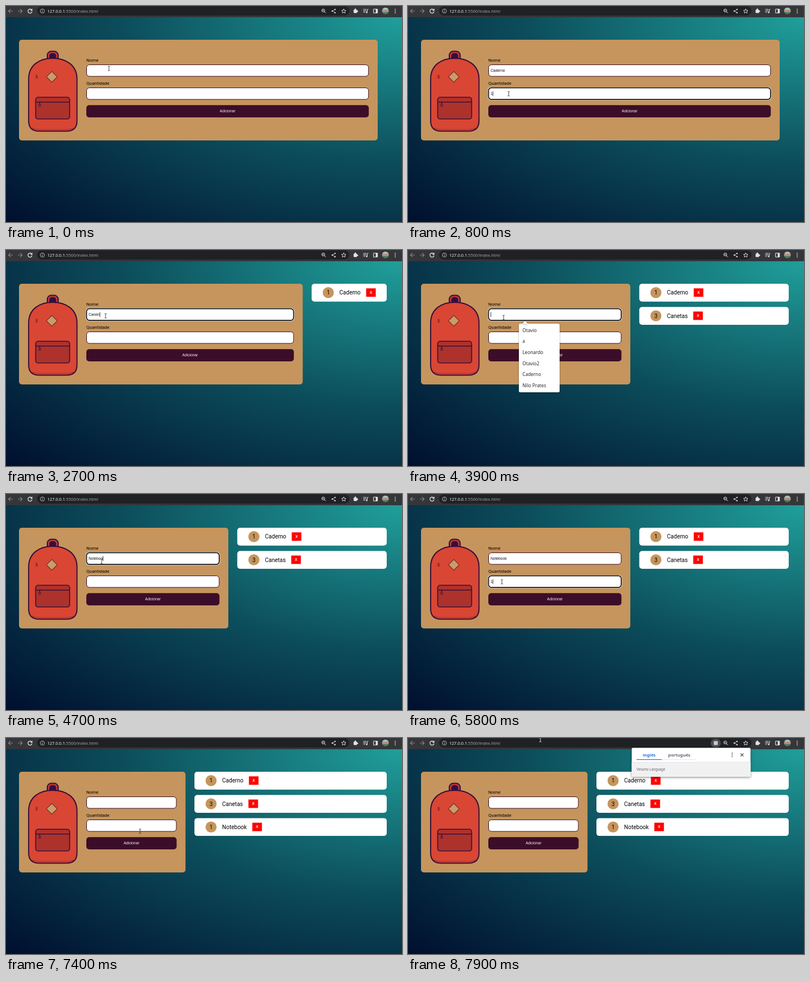
Recreate the animation shown at these times as an HTML page with a canvas. Size 700 px wide and 384 px high, loop 8 s.

```html
<!DOCTYPE html>
<html lang="pt">
<head>
<meta charset="utf-8">
<title>Mochila</title>
<style>
html, body { margin: 0; width: 100%; height: 100%; overflow: hidden; background: #0b4b59; }
canvas { display: block; width: 700px; height: 384px; }
</style>
</head>
<body>
<canvas id="stage" width="700" height="384"></canvas>
<script>
const ctx = document.getElementById('stage').getContext('2d');
const LOOP = 8000, STEP = 100;
const TAN = '#c5955d', WINE = '#3c0d28', INK = '#3a0f38';
const UI = '"Noto Sans", sans-serif', PAGE = 'Roboto, sans-serif', FIELD = '"Liberation Sans", Arial, sans-serif';
const SUGGESTIONS = ['Otavio', 'a', 'Leonardo', 'Otavio2', 'Caderno', 'Nilo Prates'];
const PRODUCTS = [['1', 'Caderno'], ['3', 'Canetas'], ['1', 'Notebook']];
const FORM_RIGHT = [657, 524.5, 393, 317.3];

// Each event overrides part of the page state from its time on.
const EVENTS = [
  [0, { focus: '', name: '', qty: '', items: 0, menu: false, popup: false }],
  [200, { focus: 'name', menu: true }],
  [300, { name: 'Ca' }], [400, { name: 'Cade' }],
  [500, { name: 'Caderno', menu: false }],
  [700, { focus: 'qty' }], [800, { qty: '1' }],
  [1100, { focus: '', name: '', qty: '', items: 1 }],
  [1400, { focus: 'name', menu: true }],
  [1800, { name: 'C' }], [2000, { name: 'Ca' }], [2200, { name: 'Can' }],
  [2500, { name: 'Cane' }], [2700, { name: 'Canen' }], [2800, { name: 'Cane' }],
  [2900, { name: 'Caneta' }], [3000, { name: 'Canetas', menu: false }],
  [3300, { focus: 'qty' }], [3400, { qty: '3' }],
  [3700, { focus: '', name: '', qty: '', items: 2 }],
  [3900, { focus: 'name', menu: true }],
  [4200, { name: 'N' }], [4300, { name: 'No' }], [4400, { name: 'Not' }],
  [4500, { name: 'Note' }], [4600, { name: 'Noteb' }], [4700, { name: 'Noteboo' }],
  [4800, { name: 'Notebook', menu: false }],
  [5400, { focus: 'qty' }], [5700, { qty: '1' }],
  [6300, { focus: '', name: '', qty: '', items: 3 }],
  [7700, { popup: true }]
];

const POINTER = [
  [0, 182, 111], [500, 182, 113], [650, 178, 156], [850, 178, 156], [1000, 215, 188],
  [1150, 215, 188], [1400, 176, 117], [3050, 176, 117], [3250, 172, 156], [3400, 172, 156],
  [3600, 200, 188], [3700, 200, 188], [3850, 169, 120], [4900, 169, 120], [5300, 166, 156],
  [5800, 166, 156], [6200, 206, 188], [6700, 206, 188], [7100, 232, 250], [7500, 238, 150],
  [7800, 234, 3], [8000, 234, 3]
];

function stateAt(t) {
  return Object.assign({}, ...EVENTS.filter(e => e[0] <= t).map(e => e[1]));
}

function pointerAt(t) {
  const i = POINTER.findIndex(p => p[0] > t);
  const [t0, x0, y0] = POINTER[i - 1], [t1, x1, y1] = POINTER[i];
  const u = (t - t0) / (t1 - t0), k = u * u * (3 - 2 * u);
  return [x0 + (x1 - x0) * k, y0 + (y1 - y0) * k];
}

function paint(fill, stroke, width = 1) {
  if (fill) { ctx.fillStyle = fill; ctx.fill(); }
  if (stroke) { ctx.strokeStyle = stroke; ctx.lineWidth = width; ctx.stroke(); }
}

function box(x, y, w, h, r, fill, stroke, width) {
  ctx.beginPath();
  ctx.roundRect(x, y, w, h, r);
  paint(fill, stroke, width);
}

function disc(x, y, r, fill, stroke, width) {
  ctx.beginPath();
  ctx.arc(x, y, r, 0, Math.PI * 2);
  paint(fill, stroke, width);
}

function shape(path, fill, stroke, width) {
  const p = new Path2D(path);
  if (fill) { ctx.fillStyle = fill; ctx.fill(p); }
  if (stroke) { ctx.strokeStyle = stroke; ctx.lineWidth = width || 1; ctx.stroke(p); }
}

function text(str, x, y, font, color, align = 'left') {
  ctx.font = font;
  ctx.fillStyle = color;
  ctx.textAlign = align;
  ctx.fillText(str, x, y);
  return ctx.measureText(str).width;
}

function shadowed(draw, blur, alpha) {
  ctx.save();
  ctx.shadowColor = `rgba(0,0,0,${alpha})`;
  ctx.shadowBlur = blur;
  ctx.shadowOffsetY = 1;
  draw();
  ctx.restore();
}

function drawBackground() {
  ctx.save();
  ctx.translate(700, 20);
  ctx.scale(700 * Math.SQRT2, 364 * Math.SQRT2);
  const g = ctx.createRadialGradient(0, 0, 0, 0, 0, 1);
  g.addColorStop(0, '#209f9b');
  g.addColorStop(0.5, '#0c4d5b');
  g.addColorStop(1, '#000f2e');
  ctx.fillStyle = g;
  ctx.fillRect(-1, 0, 1, 1);
  ctx.restore();
}

function drawToolbar(popup) {
  const light = '#e3e4e6', dim = '#85878a';
  ctx.fillStyle = '#35363a';
  ctx.fillRect(0, 0, 700, 19.5);
  box(55, 0.5, 552, 16.5, 8.2, '#202124');
  shape('M12 9H4.5M8 5.3L4.3 9L8 12.7', null, dim, 1.1);
  shape('M21 9H28.5M25 5.3L28.7 9L25 12.7', null, dim, 1.1);
  shape('M45.4 7A3.6 3.6 0 1 0 46 9.8', null, light, 1.3);
  shape('M46.6 4.6V8.4H42.8Z', light);
  disc(64.3, 9, 3.7, null, '#c4c6c9', 0.9);
  shape('M64.3 8.4V11M64.3 6.5V7.4', null, '#c4c6c9', 0.9);
  const host = text('127.0.0.1', 73, 11.6, '7.4px ' + UI, '#f1f2f3');
  text(':5500/index.html', 73 + host, 11.6, '7.4px ' + UI, '#a0a3a7');

  if (popup) {
    box(535, 1.5, 18, 15, 7.5, '#4b4d51');
    box(540.5, 5.5, 7, 7, 1, '#c9cbce');
  }
  disc(560.8, 8, 2.6, null, light, 1);
  shape('M562.8 10L565.4 12.6M559.5 8H562', null, light, 1);
  shape('M581.5 6.2L576.8 9L581.5 11.8', null, light, 0.8);
  for (const [x, y] of [[581.6, 6.1], [576.7, 9], [581.6, 11.9]]) disc(x, y, 1.2, light);
  shape('M597 5L598.1 7.7L601 7.9L598.8 9.8L599.5 12.6L597 11.1L594.5 12.6L595.2 9.8L593 7.9L595.9 7.7Z', null, light, 0.9);
  box(614.5, 6.5, 6, 6, 0.8, light);
  disc(617.5, 6, 1.4, light);
  disc(621, 9.4, 1.4, light);
  shape('M631.5 6H637M631.5 8.5H637M631.5 11H635M638.5 11.5V6H640.5', null, light, 1);
  disc(637.6, 11.4, 1.3, light);
  box(649.7, 5.5, 7, 7, 0.8, null, light, 1.1);
  ctx.fillStyle = light;
  ctx.fillRect(653.6, 5.5, 3, 7);
  ctx.save();
  ctx.beginPath();
  ctx.arc(670.7, 8.8, 6, 0, 7);
  ctx.clip();
  const bands = ['#9fc3c4', '#b98d78', '#3f8061'];
  bands.forEach((c, i) => { ctx.fillStyle = c; ctx.fillRect(664, 2.5 + i * 4.2, 14, 4.5); });
  ctx.restore();
  for (const y of [5.8, 9, 12.2]) disc(688, y, 0.9, light);
}

function drawBackpack() {
  box(73, 80.6, 19.2, 18, [7, 7, 0, 0], '#c03a35', INK, 2);
  box(77.3, 84.5, 10.6, 12, [4, 4, 0, 0], '#301044', INK, 1.5);
  const body = 'M40 130C40 105 59 93 82.5 93S125.5 105 125.5 130V204Q125.5 222.5 107 222.5H58.5Q40 222.5 40 204Z';
  shape(body, '#d94634');
  shape('M46 217Q52 220 60 219.5H105Q114 220 120 217', null, '#b5352e', 1.4);
  shape(body, null, INK, 2);
  shape('M81 116.3L90.6 125.9L81 135.5L71.4 125.9Z', '#cb9b68', '#6f2a2f', 1.1);
  ctx.fillStyle = '#9d2a2c';
  ctx.fillRect(52.5, 122.5, 3.2, 6.5);
  box(52.5, 162.3, 60, 38.5, 4, '#ad322c', INK, 1.6);
  shape('M52.5 170.8H112.5', null, INK, 1.5);
  shape('M59.5 171V174.5', null, INK, 1.3);
  box(58.2, 174.3, 2.8, 4.2, 1, null, INK, 1);
}

function drawInput(y, right, value, focused) {
  const w = right - 142;
  if (focused) {
    box(141, y - 1, w + 2, 23.5, 6, '#fff');
    box(142.4, y + 0.4, w - 0.8, 20.7, 5, '#fff', '#101010', 1.7);
  } else {
    box(142.5, y + 0.5, w - 1, 20.5, 5, '#fff', WINE, 1);
  }
  const end = 146 + text(value, 146, y + 13.2, '6.67px ' + FIELD, '#111');
  if (focused) {
    ctx.fillStyle = '#111';
    ctx.fillRect(end, y + 6.5, 0.8, 8.5);
  }
}

function drawForm(s) {
  const right = FORM_RIGHT[s.items], inner = right - 15.7;
  box(23, 60, right - 23, 179, 5, TAN);
  drawBackpack();
  text('Nome', 142, 98.8, '8px ' + PAGE, '#000');
  drawInput(104, inner, s.name, s.focus === 'name');
  text('Quantidade', 142, 139.6, '8px ' + PAGE, '#000');
  drawInput(145, inner, s.qty, s.focus === 'qty');
  box(142, 176.3, inner - 142, 21.7, 5, WINE);
  text('Adicionar', (142 + inner) / 2, 189.4, '6.67px ' + FIELD, '#f4eef1', 'center');
}

function drawList(count) {
  const x = FORM_RIGHT[count] + 15.8;
  PRODUCTS.slice(0, count).forEach(([qty, label], i) => {
    const y = 60 + i * 41.2;
    box(x, y, 673 - x, 31.7, 5, '#fff');
    disc(x + 29.4, y + 15.8, 9.8, TAN);
    text(qty, x + 29.4, y + 19.3, '10px ' + PAGE, '#000', 'center');
    const w = text(label, x + 49, y + 19.3, '10px ' + PAGE, '#000');
    const bx = x + 58.8 + w;
    ctx.fillStyle = '#f00';
    ctx.fillRect(bx, y + 8.2, 17, 15);
    text('X', bx + 8.5, y + 18, 'bold 6.4px ' + FIELD, '#fff', 'center');
  });
}

function drawMenu(prefix) {
  const rows = SUGGESTIONS.filter(v => v.toLowerCase().startsWith(prefix.toLowerCase()));
  if (!rows.length) return;
  shadowed(() => {
    box(196, 131, 72, 4 + rows.length * 19.65, 2.5, '#fff');
    shape('M202 131.5L207 126.3L212 131.5Z', '#fff');
  }, 3, 0.35);
  rows.forEach((v, i) => text(v, 202.3, 145.8 + i * 19.65, '8.2px ' + UI, '#25282b'));
}

function drawPopup() {
  shadowed(() => box(395.5, 17.5, 210, 51.5, 2, '#fff'), 4, 0.5);
  box(395.5, 43, 210, 26, [0, 0, 2, 2], '#f1f1f2');
  shape('M395.5 43H605.5', null, '#dcdddf', 0.8);
  text('inglês', 426.3, 32.8, 'bold 7.6px ' + UI, '#2f76d2', 'center');
  text('português', 479.5, 32.8, 'bold 7.6px ' + UI, '#64686d', 'center');
  shape('M448.5 38.6H509', null, '#dcdddf', 0.8);
  shape('M404 38.3H448.5', null, '#2f76d2', 1.3);
  for (const y of [27, 30, 33]) disc(573, y, 0.9, '#55585c');
  shape('M587.8 27.5L593 32.7M593 27.5L587.8 32.7', null, '#45484c', 1.1);
  text('Velumo Language', 404, 58.3, '6.3px ' + PAGE, '#676a6e');
}

function drawPointer(x, y, right) {
  const overPage = x > 142 && x < right - 16;
  const overField = overPage && ((y > 104 && y < 126) || (y > 145 && y < 167));
  ctx.save();
  ctx.translate(x, y);
  if (y < 18 || overField) {
    const beam = 'M-1.8 -4Q0 -4 0 -3V3Q0 4 -1.8 4M1.8 -4Q0 -4 0 -3M0 3Q0 4 1.8 4';
    shape(beam, null, y < 18 ? '#f0f0f0' : '#333', 0.9);
  } else if (overPage && y > 176 && y < 198) {
    shape('M-1.7 -3.5Q-.7 -4.6 .2 -3.4V-.6L3.6 0Q4.5 .4 4.2 1.8L3.3 5H-1.3L-4 1.6Q-3.7 .2 -1.7 1.4Z', '#111', '#fff', 0.9);
    shape('M1.4 0V2M2.9 .3V2', null, '#fff', 0.5);
  } else {
    shape('M0 0V8.6L2 6.8L3.4 9.8L4.8 9.2L3.5 6.3H6.2Z', '#111', '#fff', 0.8);
  }
  ctx.restore();
}

function render(now) {
  const t = Math.floor((now % LOOP) / STEP) * STEP;
  const s = stateAt(t);
  drawBackground();
  drawToolbar(s.popup);
  drawForm(s);
  drawList(s.items);
  if (s.menu && s.focus === 'name') drawMenu(s.name);
  if (s.popup) drawPopup();
  drawPointer(...pointerAt(t), FORM_RIGHT[s.items]);
}

const start = performance.now();
function tick() {
  render(performance.now() - start);
  requestAnimationFrame(tick);
}
tick();
</script>
</body>
</html>
```
